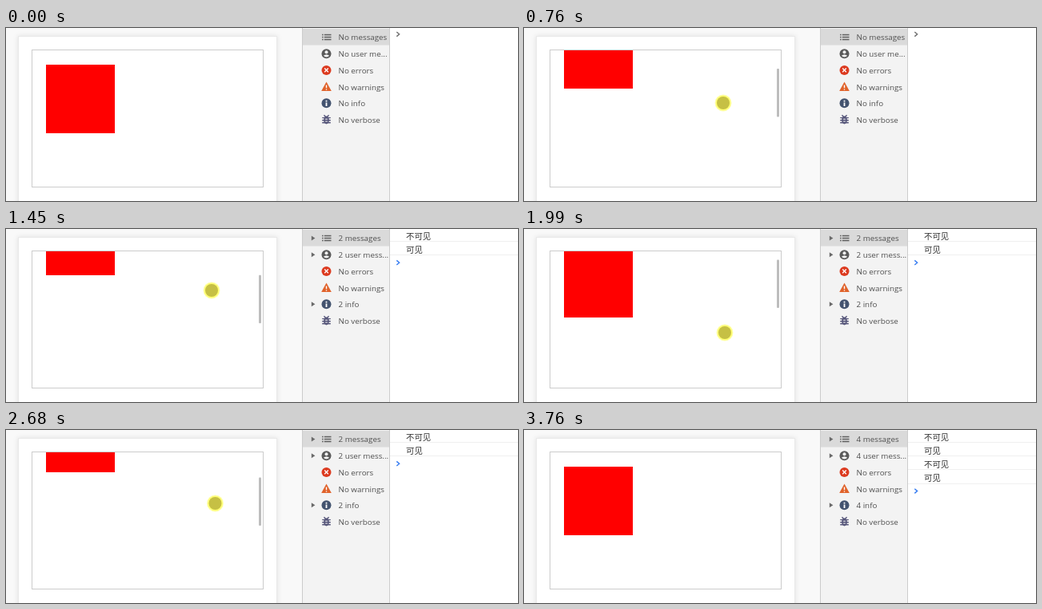
Recreate the animation shown at these times as an HTML page. Size 640 by 217 pixels, loop 3840 ms.

```html
<!DOCTYPE html>
<html lang="zh">
<head>
<meta charset="utf-8">
<style>
html, body { margin: 0; width: 100%; height: 100%; overflow: hidden; background: #fff; }
svg { display: block; }
text { font: 9.8px "Open Sans", "Noto Sans", sans-serif; fill: #505050; }
#log text { font: 10.4px "Noto Sans CJK SC", "Noto Sans CJK", sans-serif; fill: #303030; }
.card { filter: drop-shadow(0 0 3px rgba(0, 0, 0, .1)); }
.line { fill: none; stroke-width: 1.4; }
</style>
</head>
<body>
<svg width="640" height="217" viewBox="0 0 640 217">
  <rect width="371" height="217" fill="#f9f9f9"/>
  <rect class="card" x="15.5" y="10.5" width="323" height="230" fill="#fff" stroke="#e9e9e9"/>
  <rect x="32.5" y="27.5" width="289" height="172" fill="#fff" stroke="#ccc"/>
  <svg x="33" y="28" width="288" height="171">
    <rect id="box" x="17" width="86" height="86" fill="#f00"/>
  </svg>
  <rect id="thumb" x="316" width="3" height="60.5" rx="1" fill="#bdbdbd"/>
  <g id="cursor">
    <circle r="10.5" fill="#ff0" opacity=".3"/>
    <circle r="9.5" fill="#ffff73"/>
    <circle r="8" fill="#c6c044"/>
  </g>

  <rect x="370" width="110" height="217" fill="#f3f3f3"/>
  <rect x="370" y="1" width="110" height="20.5" fill="#dadada"/>
  <path d="M370.5 0V217M479.5 0V217" stroke="#ccc"/>
  <g id="icons">
    <g fill="#5f5f5f">
      <path class="line" stroke="#5f5f5f" d="M-5.5 -3h1.6m1.2 0H6M-5.5 0h1.6m1.2 0H6M-5.5 3h1.6m1.2 0H6"/>
    </g>
    <g>
      <circle r="6" fill="#5a5a5a"/>
      <circle cy="-2" r="2" fill="#f3f3f3"/>
      <path d="M-3.7 2.6Q0 -.6 3.7 2.6Q0 6 -3.7 2.6" fill="#f3f3f3"/>
    </g>
    <g>
      <circle r="6" fill="#dc3b20"/>
      <path class="line" stroke="#fff" d="M-2.3 -2.3L2.3 2.3M2.3 -2.3L-2.3 2.3"/>
    </g>
    <g>
      <path d="M0 -6L6.3 5.5H-6.3Z" fill="#e0622a"/>
      <path class="line" stroke="#fff" d="M0 -2.2V1.7M0 2.8V4.2"/>
    </g>
    <g>
      <circle r="6" fill="#43536f"/>
      <path stroke="#fff" stroke-width="1.8" d="M0 -3.5V-1.8M0 -.7V3.6"/>
    </g>
    <g>
      <ellipse cy=".5" rx="3.3" ry="5" fill="#56567a"/>
      <path class="line" stroke="#56567a" d="M-5.3 -2.4H5.3M-5.3 .7H5.3M-5.3 3.8H5.3M-3 -5.7L-1 -3.6M3 -5.7L1 -3.6"/>
      <path stroke="#f3f3f3" d="M-1.4 -.7H1.4M-1.4 2.1H1.4"/>
    </g>
  </g>
  <g id="arrows" fill="#6a6a6a"></g>
  <g id="labels"></g>
  <g id="log"></g>
  <path id="prompt" class="line" d="M488.3 -2.8L491.6 0L488.3 2.8"/>
</svg>
<script>
const LOOP = 3840, STEP = 76.8;
const $ = id => document.getElementById(id);

// Key points: [step, value]
const cursorX = [[1, 325], [6, 238], [7, 240], [13, 258], [15, 262], [16, 262], [19, 257], [26, 251], [30, 252], [35, 261.5], [38, 262], [42, 250]];
const cursorY = [[1, 173], [6, 156], [7, 138], [13, 50], [15, 17], [16, 17], [17, 32], [19, 77], [26, 130], [30, 172], [31, 166], [35, 92], [37, 55], [38, 46], [39, 62], [40, 100], [41, 150], [42, 208]];
// Pointer height at which the dragged content rests at scroll zero
const dragOrigin = [[7, 151], [13, 148], [16, 148], [19, 151], [29, 151], [30, 171]];
const logSteps = [13, 18, 37, 40];

function track(keys, at) {
  const next = keys.findIndex(k => k[0] >= at);
  if (next < 0) return keys[keys.length - 1][1];
  if (!next) return keys[0][1];
  const [a, va] = keys[next - 1], [b, vb] = keys[next];
  return va + (vb - va) * (at - a) / (b - a);
}

const rowY = row => 11.5 + row * 20.7;
const logY = row => 8.6 + row * 17.2;

function labels(n) {
  return [
    n ? `${n} message${n > 1 ? "s" : ""}` : "No messages",
    n ? `${n} user mess...` : "No user me...",
    "No errors", "No warnings",
    n ? `${n} info` : "No info",
    "No verbose"
  ];
}

[...$("icons").children].forEach((icon, row) =>
  icon.setAttribute("transform", `translate(400.5 ${rowY(row)})`));
$("arrows").innerHTML = [0, 1, 4].map(row =>
  `<path d="M381.8 ${rowY(row) - 3}l4.6 3l-4.6 3z"/>`).join("");

let shown = -1;
function showLogs(n) {
  if (n === shown) return;
  shown = n;
  $("labels").innerHTML = labels(n).map((label, row) =>
    `<text x="415.5" y="${rowY(row) + 3.9}">${label}</text>`).join("");
  $("log").innerHTML = logSteps.slice(0, n).map((_, row) =>
    `<text x="500" y="${logY(row) + 4}">${row % 2 ? "可见" : "不可见"}</text>
     <path d="M480 ${Math.round(logY(row) + 7.4) - .5}H640" stroke="#f0f0f0"/>`).join("");
  $("arrows").setAttribute("opacity", n ? 1 : 0);
  $("prompt").setAttribute("transform", `translate(0 ${7.8 + n * 17.2})`);
  $("prompt").setAttribute("stroke", n ? "#367cf1" : "#6e6e6e");
}

function draw(now) {
  // The small offset keeps the 10 ms frame clock aligned with whole steps
  const step = Math.min(49, Math.floor((now % LOOP + 10) / STEP));
  const y = track(cursorY, step);
  const scroll = step < 7 ? 0 : Math.max(0, track(dragOrigin, step) - y);
  $("cursor").setAttribute("transform", `translate(${track(cursorX, step)} ${y})`);
  $("cursor").setAttribute("opacity", step > 0 && step < 43 ? 1 : 0);
  $("box").setAttribute("y", 18 - Math.round(scroll));
  $("thumb").setAttribute("y", 31 + scroll * .36);
  $("thumb").setAttribute("opacity", step < 7 || step > 48 ? 0 : step > 47 ? .5 : 1);
  showLogs(logSteps.filter(s => s <= step).length);
}

const start = performance.now();
function tick() {
  draw(performance.now() - start);
  requestAnimationFrame(tick);
}
tick();
</script>
</body>
</html>
```
